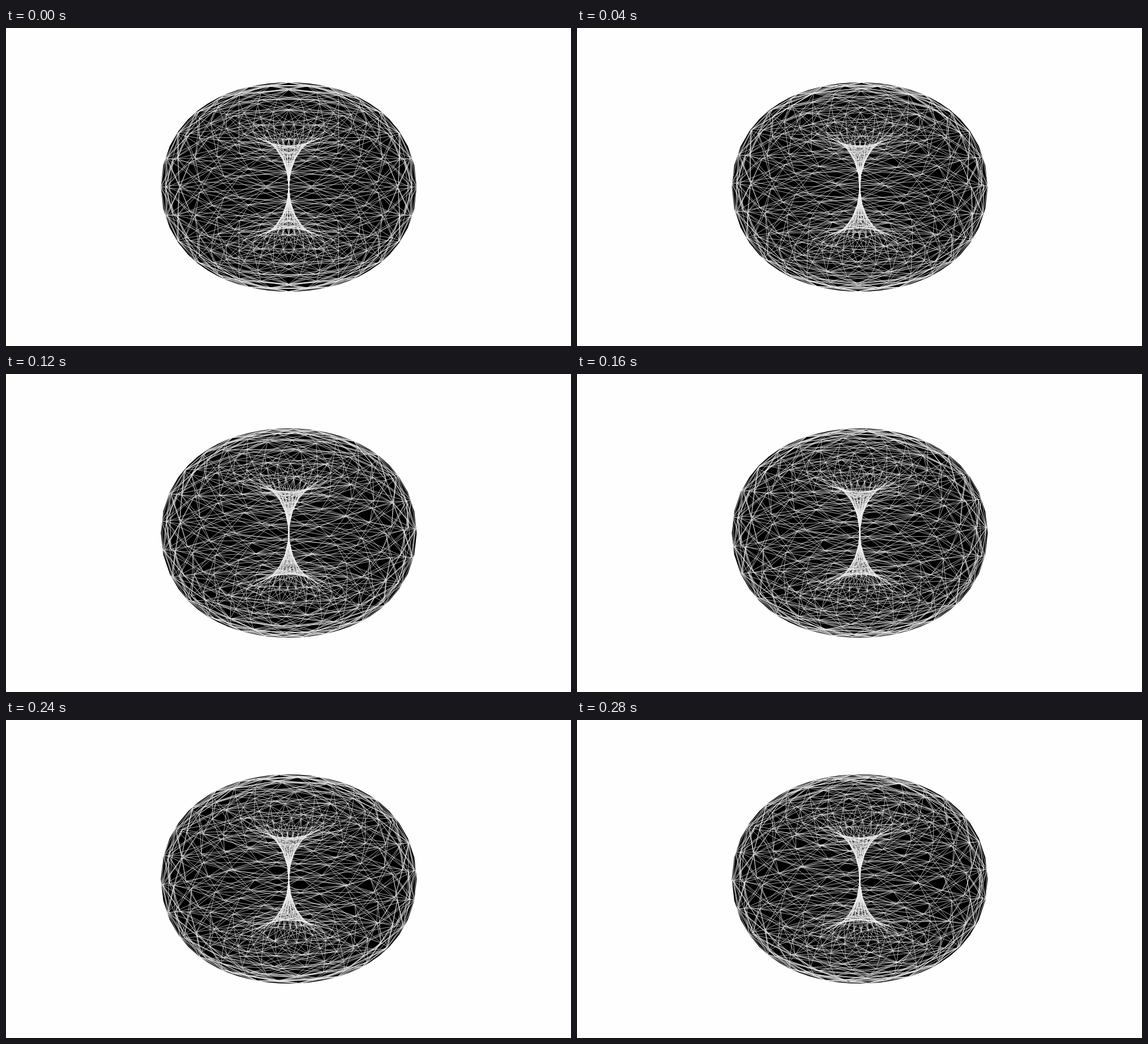
These frames come from a looping animation (998x561 px, 300 ms). An HTML page with a canvas:

```html
<!DOCTYPE html>
<html lang="en">
<head>
<meta charset="utf-8">
<title>Horn torus</title>
<style>
  html, body { margin: 0; width: 100%; height: 100%; overflow: hidden; background: #fefefe; }
  canvas { display: block; width: 998px; height: 561px; }
</style>
</head>
<body>
<canvas id="stage" width="998" height="561"></canvas>
<script>
const ctx = document.getElementById('stage').getContext('2d');
const LOOP = 300, STEP = 40;
const CX = 499.5, CY = 280.5, R = 113;
const TILT = 0.496, RISE = 1.022;
const N = 28, CELL = 2 * Math.PI / N;
const RAD = Math.PI / 180;
const SPIN = 1.13 * RAD, ROLL = 2.34 * RAD;

// Links from each vertex of the staggered grid: [columns, rows]
const LINKS = [[2, 0], [1, 1], [1, -1], [3, 1], [3, -1]];

// Screen position of a point on the horn torus
function project(theta, phi) {
  const rho = 1 + Math.cos(phi);
  return [
    CX + R * rho * Math.cos(theta),
    CY + R * (TILT * rho * Math.sin(theta) - RISE * Math.sin(phi))
  ];
}

function vertex(col, row, step) {
  return project(Math.PI / 2 + col * CELL + step * SPIN, row * CELL + step * ROLL);
}

// The outer contour lies where the surface turns edge-on
function silhouette() {
  const path = new Path2D();
  for (let i = 0; i < 2 * N; i++) {
    const theta = i * CELL / 2;
    const phi = -Math.atan(RISE / TILT * Math.sin(theta));
    path.lineTo(...project(theta, phi));
  }
  path.closePath();
  return path;
}

function line(a, b) {
  ctx.beginPath();
  ctx.moveTo(...a);
  ctx.lineTo(...b);
  ctx.stroke();
}

const shape = silhouette();

function draw(step) {
  ctx.fillStyle = '#fefefe';
  ctx.fillRect(0, 0, 998, 561);
  ctx.save();
  ctx.fillStyle = '#000';
  ctx.fill(shape);
  ctx.clip(shape);
  ctx.strokeStyle = 'rgba(236, 236, 236, 0.72)';
  ctx.lineWidth = 0.95;
  for (let col = 0; col < N; col++) {
    for (let row = (col + 1) % 2; row < N; row += 2) {
      const from = vertex(col, row, step);
      for (const [dc, dr] of LINKS) line(from, vertex(col + dc, row + dr, step));
    }
  }
  ctx.restore();
}

let start = null, shown = -1;
function tick(now) {
  if (start === null) start = now;
  const step = Math.floor(((now - start) % LOOP) / STEP);
  if (step !== shown) draw(shown = step);
  requestAnimationFrame(tick);
}
draw(shown = 0);
requestAnimationFrame(tick);
</script>
</body>
</html>
```
